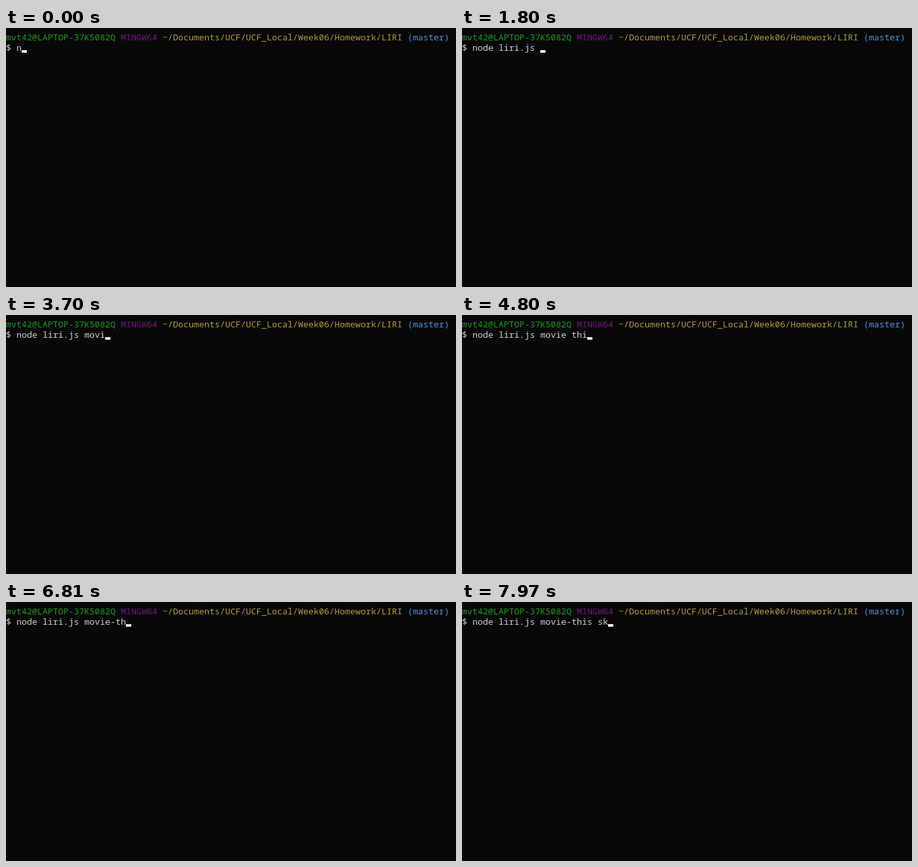
Animation of 690 by 398 pixels, one loop 8 s. Source, as an HTML page:

```html
<!DOCTYPE html>
<html lang="en">
<head>
<meta charset="utf-8">
<title>Terminal typing</title>
<style>
  html, body { margin: 0; width: 100%; height: 100%; overflow: hidden; background: #080809; }
  pre {
    position: absolute; left: 0; top: 6px; margin: 0;
    font: 13.3333px/16px "Noto Sans Mono", monospace;
    font-variant-ligatures: none;
    color: #d2d2c8;
  }
  .user { color: #229a22; }
  .system { color: #76197f; }
  .path { color: #b59a42; }
  .branch { color: #4f94d4; }
  #cursor { position: absolute; top: 34px; width: 8px; height: 4px; background: #f4f4f2; }
</style>
</head>
<body>
<pre><span class="user">mvt42@LAPTOP-37K5082Q</span> <span class="system">MINGW64</span> <span class="path">~/Documents/UCF/UCF_Local/Week06/Homework/LIRI</span> <span class="branch">(master)</span>
$ <span id="command">n</span></pre>
<div id="cursor"></div>
<script>
const LOOP = 8000;
const CELL = 8;
const PROMPT_LENGTH = 2;

// Each burst: start in ms, ms per key, keys ("\b" deletes one character).
const bursts = [
  [0, 135, "node liri.js "],
  [3000, 190, "movi"],
  [3860, 200, "e this"],
  [5200, 150, "\b\b\b\b\b"],
  [6250, 220, "-this sk"]
];

const command = document.getElementById("command");
const cursor = document.getElementById("cursor");

function typedAt(time) {
  let text = "";
  for (const [start, interval, keys] of bursts) {
    [...keys].forEach((key, i) => {
      if (time < start + i * interval) return;
      text = key === "\b" ? text.slice(0, -1) : text + key;
    });
  }
  return text;
}

function draw() {
  const text = typedAt(performance.now() % LOOP);
  if (command.textContent !== text) command.textContent = text;
  cursor.style.left = (PROMPT_LENGTH + text.length) * CELL + "px";
  requestAnimationFrame(draw);
}
draw();
</script>
</body>
</html>
```
